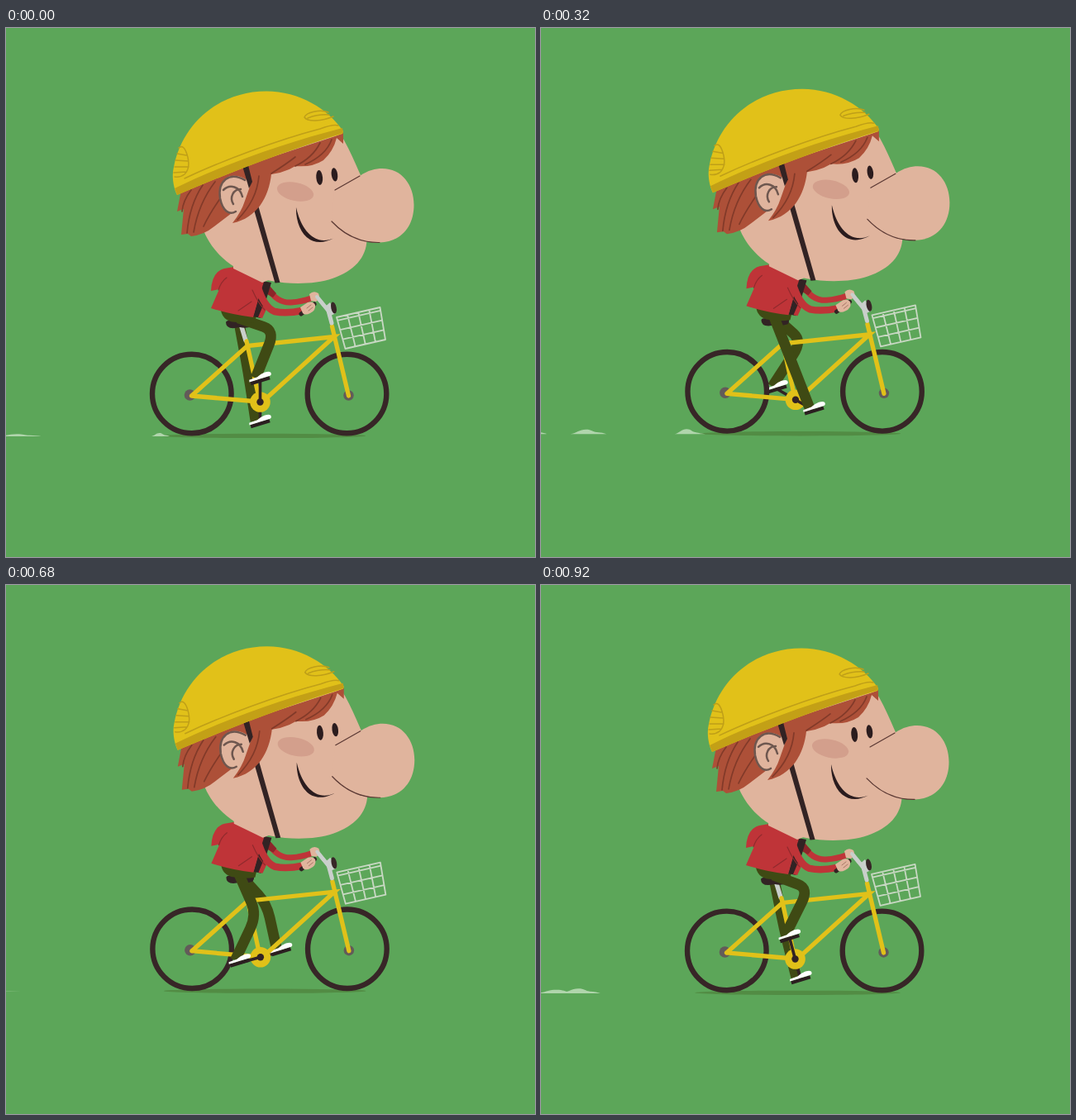
Animation of 640 by 640 pixels, one loop 960 ms. Source, as an HTML page:

```html
<!DOCTYPE html>
<html lang="en">
<head>
<meta charset="utf-8">
<title>Cyclist</title>
<style>
html, body { margin: 0; width: 100%; height: 100%; overflow: hidden; background: #5ca659; }
svg { display: block; width: 100vw; height: 100vh; }
.line { fill: none; stroke-linecap: round; stroke-linejoin: round; }
.frame { fill: none; stroke: #e1c119; stroke-width: 5.3; stroke-linecap: round; }
.leg { fill: none; stroke: #3f4a14; stroke-width: 12.8; }
.crank { stroke: #322324; stroke-width: 3.6; stroke-linecap: round; }
</style>
</head>
<body>
<svg viewBox="0 0 640 640">
  <defs>
    <g id="foot">
      <rect x="-12" y="-2" width="24" height="4.4" fill="#2b1f20"/>
      <path d="M-13-2L-12.500-4.500L-2-5C4-8 12-9 15-6Q16-3 13-2Z" fill="#fff"/>
    </g>
    <g id="wheel">
      <circle r="47.8" fill="none" stroke="#372627" stroke-width="6.4"/>
    </g>
  </defs>
  <rect width="640" height="640" fill="#5ca659"/>
  <g id="root">
    <ellipse id="shadow" cy="493.4" ry="2.7" fill="#528c44"/>
    <path id="dust" fill="#b0d5ac"/>

    <path id="legB" class="leg"/>
    <line id="crankB" class="crank"/>
    <use id="footB" href="#foot"/>

    <!-- bicycle -->
    <use href="#wheel" x="224.8" y="442.5"/>
    <use href="#wheel" x="412.5" y="442.5"/>
    <circle cx="222.5" cy="444" r="6.8" fill="#625b59"/>
    <circle cx="414.5" cy="444.5" r="6.2" fill="#625b59"/>
    <path class="line" d="M284 358L290 378" stroke="#c9cfcb" stroke-width="5.5"/>
    <path class="frame" d="M291 379L307 452M224.500 445L292 384.500L397 373.500L310 452.500L224.500 445M394.500 361L414.500 445"/>
    <circle cx="307.5" cy="452.5" r="12.3" fill="#e1c119"/>
    <path d="M266 356Q267 353 275 354L297 353Q302 355 298 361Q290 364 283 362Q266 366 266 356Z" fill="#322324"/>
    <circle cx="307.5" cy="452.5" r="4.2" fill="#322324"/>
    <line id="crankA" class="crank"/>
    <path id="legA" class="leg"/>
    <use id="footA" href="#foot"/>
    <path d="M260 342L303 348L301 356Q288 358 280 356Q263 356 260 342Z" fill="#3f4a14"/>

    <!-- basket and handlebar -->
    <path id="basket" class="line" stroke="#c8d8c3" stroke-width="1.8"/>
    <path class="line" d="M376 325L390 342L394 357" stroke="#c9cfcb" stroke-width="5"/>
    <path d="M385 338L392 332L399 345L391 349Z" fill="#c9cfcb"/>
    <ellipse cx="396.500" cy="338.500" rx="3.200" ry="7.200" transform="rotate(-12 396.500 338.500)" fill="#372627"/>

    <!-- torso and arms -->
    <path class="line" d="M317 315Q328 333 345 332Q358 331 369 327" stroke="#bf3438" stroke-width="7" style="stroke-linecap:butt"/>
    <path d="M318 311L327 321L323 326L314 321Z" fill="#8c2529"/>
    <path d="M367 322Q372 317 378 321Q381 327 375 331L369 330Z" fill="#e0b49d"/>
    <path class="line" d="M376 325L384 335" stroke="#c9cfcb" stroke-width="4"/>
    <path d="M311 306L321 308L308 351L299 349Z" fill="#322324"/>
    <path d="M313 331L318 334L310 351L305 350Z" fill="#bf3438"/>
    <path d="M276 289L312 307L305 329L299 350Q273 347 248 339L258 316L248 318Q249 295 264 291Z" fill="#bf3438"/>
    <path class="line" d="M257 317Q260 307 267 302M281 342L297 331" stroke="#912a2d" stroke-width="1.2"/>
    <path class="line" d="M304 311Q312 338 325 343Q339 346 358 342" stroke="#bf3438" stroke-width="8.5" style="stroke-linecap:butt"/>
    <path class="line" d="M298 317Q305 333 313 341" stroke="#912a2d" stroke-width="1.2"/>
    <path class="line" d="M357 346L373 334" stroke="#322324" stroke-width="5"/>
    <path d="M356 338L365 332Q372 330 374 335Q375 342 368 345Q362 348 359 345Z" fill="#e0b49d"/>
    <path class="line" d="M364 339L369 335M366 342L371 338" stroke="#a87767" stroke-width="1"/>

    <g id="head">
      <path d="M275 278V291L310 308L330 300Z" fill="#e0b49d"/>
      <path d="M235 232C242 263 265 286 292 297C320 310 365 313 395 303C421 294 436 278 436.500 256L440 200C428 180 419 150 404 128L220 190Z" fill="#e0b49d"/>
      <path d="M397 196L428 179C438 172 447 170 455 170C479 170 493.500 190 493.500 214C493.500 241 477 259 452 259.500C428 260 409 249 394 234Z" fill="#e0b49d"/>
      <path class="line" d="M398 196L428 179M394 234C409 250 428 260 452 259.500" stroke="#5a3833" stroke-width="1.2"/>
      <ellipse cx="350" cy="198" rx="22.500" ry="11" transform="rotate(12 350 198)" fill="#d39f8c"/>
      <ellipse cx="379.200" cy="181" rx="3.900" ry="9" transform="rotate(-5 379 181)" fill="#2b1c1e"/>
      <ellipse cx="397.400" cy="177.500" rx="3.700" ry="8.200" transform="rotate(-8 397 177)" fill="#2b1c1e"/>
      <path d="M351 217C350 242 366 271 397 254C376 264 358 248 351 217Z" fill="#2b1c1e"/>

      <!-- hair and ear -->
      <path d="M212 196L207 222L215 219L212 250L220 249L224 252Q240 250 252 240L273 224L292 180V165Z" fill="#ad5038"/>
      <path class="line" d="M224 196Q214 209 213 222M238 190Q222 214 219 248M253 186Q233 212 227 247M260 205Q246 225 239 240" stroke="#823a29" stroke-width="1.7"/>
      <path d="M290 183C270 172 256 184 259 206C262 222 272 229 281 222L294 206Z" fill="#e0b49d"/>
      <path class="line" d="M289 184C270 173 256 185 259 206C262 221 270 227 278 222M263 196C271 188 283 192 286 204M275 213C270 205 275 195 284 195" stroke="#6e574f" stroke-width="2.500"/>
      <path d="M298 213L304 211L331.500 308L325.500 308.500Z" fill="#322324"/>
      <path d="M288 167L398 131L408 127V140L400 133Q396 149 384 160Q370 169 350 167L360 160Q344 174 321 177C318 204 304 230 274 236Q285 222 289 209L295 192Z" fill="#ad5038"/>
      <path d="M286 167L293 166L298 186L294 194Z" fill="#322324"/>
      <path class="line" d="M306 179C304 202 292 220 280 232M321 176Q340 164 350 156M350 167Q371 157 380 139M362 165Q387 154 394 135" stroke="#823a29" stroke-width="1.700"/>

      <!-- helmet -->
      <path d="M207 202C203 194 200 180 203 168C214 113 260 76.500 315 76.500C355 76.500 390 98 408 125L407 128C340 148 270 175 207 202Z" fill="#e1c119"/>
      <path d="M204 194C260 166 340 138 407 121L408 127C340 148 270 175 207 202Z" fill="#c3a016"/>
      <g class="line" stroke="#bf9f18" stroke-width="1.500">
        <path d="M216 182C260 161 330 135 380 122Q396 116 402 118"/>
        <path d="M209 145Q215 140 219 153Q224 169 216 177Q211 181 204 180M207 152L218 154M205 160L220 161M204 168L221 168M203 175L218 174"/>
        <path d="M390 102C380 98 363 102 361 108C365 114 382 113 396 107M365 109Q378 104 391 105"/>
      </g>
    </g>
  </g>
</svg>
<script>
const LOOP = 960, STEP = 40, TAU = Math.PI * 2;
const HUB = [307.5, 452.5], CRANK = 26;
// birth time, width, height
const puffs = [[0, 22, 8], [156, 24, 7], [308, 32, 10], [316, 28, 5], [346, 26, 8],
               [370, 24, 5], [436, 20, 7], [712, 30, 10], [745, 26, 8]];
const el = id => document.getElementById(id);
const set = (id, attrs) => { for (const k in attrs) el(id).setAttribute(k, attrs[k]); };
const mix = (a, b, k) => [a[0] + (b[0] - a[0]) * k, a[1] + (b[1] - a[1]) * k];

function drawBasket() {
  const a = [400, 350], b = [452.5, 338], c = [459, 377], d = [410.5, 388];
  const row = k => `M${mix(a, d, k)}L${mix(b, c, k)}`;
  const column = k => `M${mix(a, b, k)}L${mix(d, c, k)}`;
  set('basket', {
    d: [0, .1, .4, .7, 1].map(row).join('') + [0, .25, .5, .75, 1].map(column).join('')
  });
}

function drawLeg(side, ang) {
  const c = Math.cos(ang), s = Math.sin(ang);
  const pedal = [HUB[0] + CRANK * s, HUB[1] - CRANK * c];
  const hip = [281, 351];
  const knee = [309 + 16 * c + 2 * s, 391 - 25 * c + 2 * (1 - Math.cos(2 * ang))];
  const ankle = [pedal[0] - 5.5, pedal[1] - 3];
  set('leg' + side, {
    d: `M${hip}L${mix(knee, hip, .3)}Q${knee} ${mix(knee, ankle, .3)}L${ankle}`
  });
  set('crank' + side, { x1: HUB[0], y1: HUB[1], x2: pedal[0], y2: pedal[1] });
  set('foot' + side, { transform: `translate(${pedal}) rotate(-17)` });
}

function puffPath([birth, width, height], t) {
  const age = (t - birth + LOOP) % LOOP;
  if (age > 250) return '';
  const x = 186 - .8 * age, w = width + .12 * age;
  const h = height * Math.sin(Math.PI * (age + 50) / 300);
  const p = (dx, dy) => `${x + dx * w} ${494 - dy * h} `;
  return `M${p(-.45, 0)}C${p(-.28, .2)}${p(-.2, 1)}${p(-.02, 1)}` +
         `C${p(.15, 1)}${p(.15, .5)}${p(.28, .4)}Q${p(.45, .3)}${p(.55, 0)}Z`;
}

function draw(t) {
  const ang = t / LOOP * TAU, lift = 1 - Math.cos(ang);
  set('root', { transform: `translate(${.3 * lift} ${-1.8 * lift})` });
  set('head', { transform: `translate(${.3 * lift} 0)` });
  const left = 186 + 3.5 * lift, right = 435;
  set('shadow', { cx: (left + right) / 2, rx: (right - left) / 2 });
  drawLeg('A', ang);
  drawLeg('B', ang + Math.PI);
  const sliver = t > 60 && t < 680 ? 'M-2 494V491.500L6 493.500V494Z' : '';
  set('dust', { d: puffs.map(p => puffPath(p, t)).join('') + sliver });
}

const start = performance.now();
function tick() {
  const t = (performance.now() - start) % LOOP;
  draw(Math.floor(t / STEP) * STEP);
  requestAnimationFrame(tick);
}
drawBasket();
draw(0);
requestAnimationFrame(tick);
</script>
</body>
</html>
```
